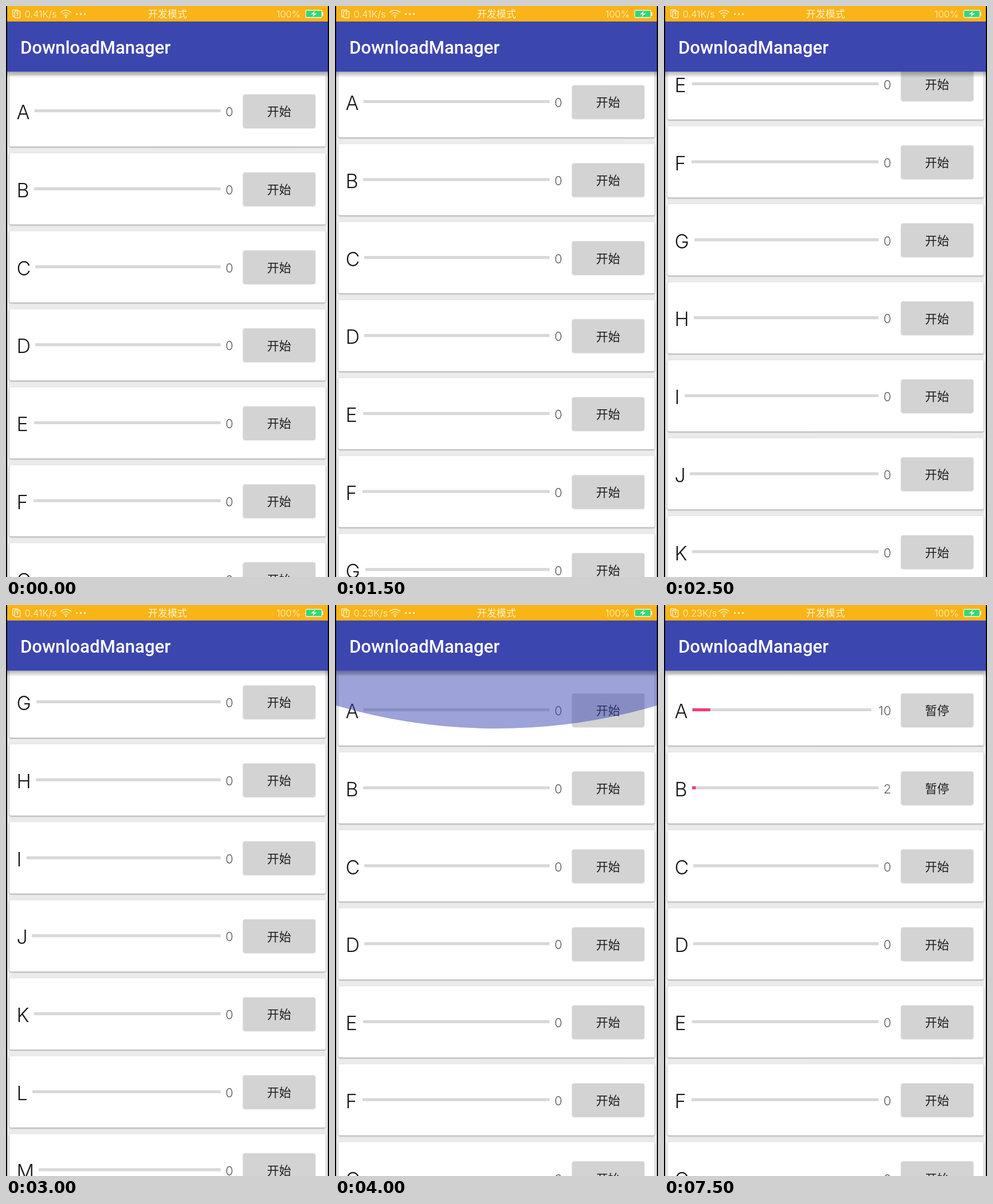
Animation, 563 px wide and 994 px high, one loop 8 s. Source, as an HTML page:

```html
<!DOCTYPE html>
<html lang="zh-CN">
<head>
<meta charset="utf-8">
<title>DownloadManager</title>
<style>
  html, body { margin: 0; width: 100%; height: 100%; overflow: hidden; background: #000; }
  svg { display: block; width: 100%; height: 100%; }
  text { font-family: Inter, "Noto Sans CJK SC", "Noto Sans CJK", sans-serif; font-weight: 300; }
  .card { fill: #fff; filter: drop-shadow(0 1.5px 1.2px #0006); }
  .button { fill: #d3d3d3; filter: drop-shadow(0 1px 1px #0004); }
  .letter { font-size: 34px; fill: #161616; }
  .count { font-size: 22px; fill: #5c5c5c; text-anchor: end; }
  .label { font: 400 21px "Noto Sans CJK SC", "Noto Sans CJK", sans-serif; fill: #1c1c1c; text-anchor: middle; }
  .title { font: 500 31.1px Roboto, sans-serif; fill: #fff; }
  .status { fill: #fff3d2; font-size: 16.5px; }
  .line { fill: none; stroke: #fff3d2; stroke-width: 1.3; }
</style>
</head>
<body>
<svg viewBox="0 0 563 994" preserveAspectRatio="none">
  <defs>
    <linearGradient id="shade" x1="0" y1="0" x2="0" y2="1">
      <stop offset="0" stop-color="#000" stop-opacity=".3"/>
      <stop offset=".5" stop-color="#000" stop-opacity=".15"/>
      <stop offset="1" stop-color="#000" stop-opacity="0"/>
    </linearGradient>
  </defs>
  <rect width="563" height="994" fill="#ebebeb"/>
  <g id="list"></g>
  <path id="glow" fill="#3c46b4"/>
  <rect y="114" width="563" height="11" fill="url(#shade)"/>
  <rect y="27" width="563" height="87.3" fill="#3c46af"/>
  <text class="title" x="25" y="83">DownloadManager</text>

  <rect width="563" height="27" fill="#fab418"/>
  <g class="line">
    <path d="M14.5 18H11.7V6.7H20.5V8.5"/>
    <rect x="15" y="9" width="9.6" height="11.5" rx="1"/>
    <path d="M18 12H22M20 12V17.5"/>
    <path d="M95 11.2Q104.500 3.500 114 11.200M98.300 14.300Q104.500 9 110.700 14.300M101.400 17.300Q104.500 14.500 107.600 17.300"/>
  </g>
  <g class="status">
    <circle cx="104.500" cy="19.500" r="1.500"/>
    <circle cx="123.500" cy="14" r="1.700"/>
    <circle cx="130.500" cy="14" r="1.700"/>
    <circle cx="137.500" cy="14" r="1.700"/>
    <text id="speed" x="32.500" y="20"></text>
    <text x="281.500" y="20" font-size="17" text-anchor="middle">开发模式</text>
    <text x="513.500" y="20" text-anchor="end">100%</text>
    <rect x="551" y="11" width="2" height="6"/>
  </g>
  <rect x="522.500" y="7.500" width="28" height="12.500" rx="1.500" fill="#2fd978" stroke="#fff3d2" stroke-width="1.300"/>
  <path d="M538.500 8.500L531.500 14.500H536L534.500 19L541.500 13H537Z" fill="#fff"/>
  <path d="M0 0H2V994H0ZM561 0H563V994H561Z"/>
</svg>
<script>
const NS = 'http://www.w3.org/2000/svg';
const LOOP = 8000, STEP = 500, PITCH = 135.75;
const START = '开始', WAIT = '等待中', PAUSE = '暂停';
const BAR_X = [49.5, 49, 51, 51, 49, 48, 53, 52, 36, 45, 49, 46, 57];
const $ = id => document.getElementById(id);

// One value per half-second screen refresh
const SCROLL = [0, 0, 0, 16, 188.6, 590, 828.4, 420];
const PROGRESS_A = { 11: 3, 12: 5, 13: 7, 14: 9, 15: 10 };

function add(parent, tag, attrs, text) {
  const el = document.createElementNS(NS, tag);
  for (const k in attrs) el.setAttribute(k, attrs[k]);
  if (text) el.textContent = text;
  return parent.appendChild(el);
}

const rows = BAR_X.map((x, i) => {
  const g = add($('list'), 'g', { transform: `translate(0 ${i * PITCH})` });
  add(g, 'rect', { class: 'card', x: 6, y: 120.5, width: 551, height: 124.3, rx: 2.5 });
  add(g, 'text', { class: 'letter', x: 18.5, y: 197 }, String.fromCharCode(65 + i));
  const bar = { x, y: 179.8, height: 5.2 };
  return {
    x,
    track: add(g, 'rect', { ...bar, fill: '#d8d8d8' }),
    fill: add(g, 'rect', { ...bar, fill: '#f43a78' }),
    count: add(g, 'text', { class: 'count', x: 396, y: 192 }),
    button: add(g, 'rect', { class: 'button', x: 413.5, y: 154, width: 125.5, height: 57.5, rx: 3 }),
    label: add(g, 'text', { class: 'label', x: 476, y: 191.3 })
  };
});

function setRow(row, value, label) {
  const width = (value < 10 ? 374 : 361.3) - row.x;
  row.track.setAttribute('width', width);
  row.fill.setAttribute('width', width * value / 100);
  row.count.textContent = value;
  row.label.textContent = label;
}

function setGlow(edge, sag, alpha) {
  const r = (279.5 ** 2 + sag ** 2) / (2 * sag);
  $('glow').setAttribute('d', `M2 114V${edge}A${r} ${r} 0 0 0 561 ${edge}V114Z`);
  $('glow').setAttribute('opacity', alpha);
}

function render(time) {
  const n = Math.floor(time % LOOP / STEP);
  $('list').setAttribute('transform', `translate(0 ${-(SCROLL[n] || 0)})`);
  $('speed').textContent = n < 8 ? '0.41K/s' : '0.23K/s';

  if (n === 8) setGlow(175, 40, 0.5);
  else setGlow(117, 8, n === 9 ? 0.1 : 0);

  rows.forEach((row, i) => {
    if (i === 0) setRow(row, PROGRESS_A[n] || 0, n < 10 ? START : n < 11 ? WAIT : PAUSE);
    else if (i === 1) setRow(row, n < 15 ? 0 : 2, n < 14 ? START : n < 15 ? WAIT : PAUSE);
    else setRow(row, 0, START);
  });
  rows[0].button.style.fill = n === 9 ? '#c6c6c6' : '';
}

const begin = performance.now();
function tick() {
  render(performance.now() - begin);
  requestAnimationFrame(tick);
}
tick();
</script>
</body>
</html>
```
